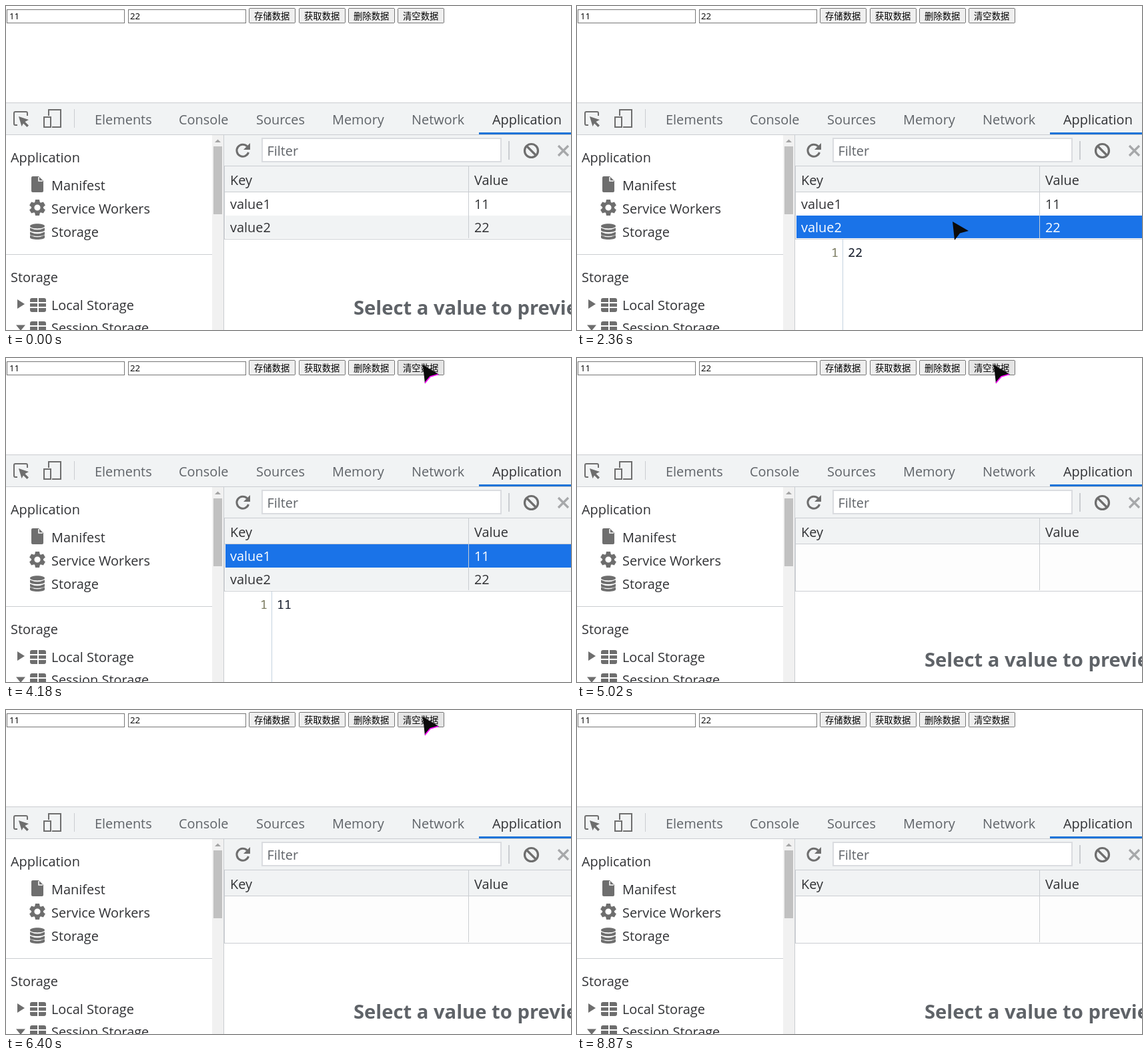
An HTML page that plays this animation: 847x487 px, repeating every 8.94 s.

```html
<!DOCTYPE html>
<html lang="zh">
<head>
<meta charset="utf-8">
<title>Storage panel</title>
<style>
html, body { margin: 0; width: 100%; height: 100%; overflow: hidden; background: #fff; }
svg { display: block; width: 847px; height: 487px; font: 19.9px "Open Sans", "Noto Sans", sans-serif; fill: #303134; }
rect, .line { shape-rendering: crispEdges; }
.line { fill: none; stroke: #cacdd1; }
.bar { fill: #f1f3f4; }
.icon { fill: #6e6e6e; }
.stroke { fill: none; stroke: #6e6e6e; stroke-width: 2; }
.dim { fill: #5f6368; }
.form { font: 13.333px "Open Sans", "Noto Sans CJK SC", "Noto Sans CJK", sans-serif; fill: #000; }
.form rect { fill: #fff; stroke: #767676; }
.form .button { fill: #efefef; }
.form .button.hover { fill: #e5e5e5; }
.code { font: 18.4px "Noto Sans Mono", "DejaVu Sans Mono", monospace; fill: #111827; }
.big { font-size: 29.2px; font-weight: 700; fill: #5f6368; }
.picked rect { fill: #1a73e8; }
.picked text { fill: #fff; }
</style>
</head>
<body>
<svg viewBox="0 0 847 487">
  <defs>
    <g id="grid" class="icon">
      <path d="M3 0H11V6H0V3Q0 0 3 0ZM13 0H21Q24 0 24 3V6H13ZM0 8H11V13H0ZM13 8H24V13H13ZM0 15H11V21H3Q0 21 0 18ZM13 15H24V18Q24 21 21 21H13Z"/>
    </g>
  </defs>

  <g class="form" id="form">
    <rect x="1.5" y="5.5" width="176" height="20"/><text x="5" y="20">11</text>
    <rect x="183.5" y="5.5" width="176" height="20"/><text x="186" y="20">22</text>
  </g>

  <rect class="bar" y="146" width="847" height="47"/>
  <path class="line" d="M0 145.5H847M0 193.5H847M102.5 155V183"/>
  <g class="stroke">
    <path d="M17 179H14Q12 179 12 177V161Q12 159 14 159H30Q32 159 32 161V165"/>
    <path d="M64 165V156H82V182H69"/>
    <rect x="57" y="167" width="10" height="15"/>
  </g>
  <path class="icon" d="M19 166L34 171L28.5 174L34 179.5L31.5 182L26 176.5L23.5 181Z"/>
  <g class="dim">
    <text x="133" y="178">Elements</text>
    <text x="259" y="178">Console</text>
    <text x="375" y="178">Sources</text>
    <text x="489" y="178">Memory</text>
    <text x="608" y="178">Network</text>
  </g>
  <text x="729" y="178">Application</text>
  <rect x="709" y="190" width="138" height="3" fill="#1a73d8"/>

  <g>
    <text x="7" y="235">Application</text>
    <text x="68" y="277">Manifest</text>
    <text x="68" y="312">Service Workers</text>
    <text x="68" y="347">Storage</text>
    <text x="7" y="415">Storage</text>
    <text x="68" y="457">Local Storage</text>
    <text x="68" y="491">Session Storage</text>
  </g>
  <path class="line" d="M0 373.5H309"/>
  <g class="icon">
    <path d="M40 256H49L56 263V278Q56 280 54 280H40Q38 280 38 278V258Q38 256 40 256Z"/>
    <path d="M49 257V263H55" fill="none" stroke="#fff" stroke-width="1.5"/>
    <g id="gear" transform="translate(47 303)"></g>
    <path d="M36 331C36 326 58 326 58 331C58 335.5 36 335.5 36 331Z"/>
    <path id="disc" d="M36 333.5Q47 339 58 333.5V337C58 341 36 341 36 337Z"/>
    <use href="#disc" y="6"/><use href="#disc" y="11"/>
    <path d="M17 441L28 448L17 455ZM15 479.5H29L22 488Z"/>
  </g>
  <use href="#grid" x="36" y="439"/>
  <use href="#grid" x="36" y="474"/>

  <rect x="309" y="194" width="17" height="293" fill="#f1f1f1"/>
  <rect x="311" y="211" width="13" height="102" fill="#c1c1c1"/>
  <path d="M313 205L317.5 200.5L322 205Z" fill="#a3a3a3"/>

  <rect class="bar" x="327" y="194" width="520" height="85"/>
  <rect x="384" y="199" width="358" height="35" fill="#fff" stroke="#dadce0" stroke-width="2"/>
  <text class="dim" x="391.5" y="225">Filter</text>
  <path class="line" d="M754 203V231" style="stroke-width:2"/>
  <path class="stroke" d="M361.5 211A9 9 0 1 0 363.5 220" style="stroke-width:3"/>
  <path class="icon" d="M366 206V216H356Z"/>
  <g class="stroke" style="stroke-width:3.2"><circle cx="787.5" cy="217.5" r="10"/><path d="M780.5 210.5L794.5 224.5"/></g>
  <path d="M828 210L843 225M843 210L828 225" stroke="#a6a8aa" stroke-width="3.2"/>
  <text x="336" y="269">Key</text><text x="702" y="269">Value</text>

  <rect id="blank" x="328" y="280" width="519" height="69" fill="#fdfdfd"/>
  <g id="rows">
    <g><rect x="329" y="280" width="518" height="35" fill="#fff"/><text x="336" y="305">value1</text><text x="702" y="305">11</text></g>
    <g><rect x="329" y="315" width="518" height="34" fill="#f1f3f4"/><text x="336" y="340">value2</text><text x="702" y="340">22</text></g>
  </g>
  <path class="line" d="M326.5 194V487M327 240.5H847M327 279.5H847M327.5 241V350M693.5 241V349M327 350.5H847"/>

  <text class="big" id="hint" x="521" y="464">Select a value to preview</text>
  <g class="code" id="preview">
    <path class="line" d="M398.5 351V487" style="stroke:#c5d3e0"/>
    <text x="381" y="377" fill="#77775c">1</text>
    <text id="shown" x="406" y="377"></text>
  </g>

  <g id="cursor">
    <path d="M0 0L24 14L11 17.5L3 28Z" fill="#0b0b0b"/>
    <path id="edge" d="M3 27L11 17.5L23 14" fill="none" stroke="#f0f" stroke-width="1.8"/>
  </g>
</svg>
<script>
const $ = id => document.getElementById(id);
const LOOP = 8940, START = 1250, STEP = 70;
const PICK_SECOND = 1900, PICK_FIRST = 2700, CLEAR = 4950, LEAVE = 7000;

// Pointer tip: time, x, y
const path = [
  [1250, 718, 487], [1600, 645, 206], [1850, 572, 321], [2080, 563, 324],
  [2360, 563, 324], [2600, 568, 299], [2990, 588, 297], [3340, 647, 19],
  [3500, 656, 22], [3850, 625, 10.5], [6680, 625, 10.5], [7520, 621, 72],
  [7940, 727, 488]
];

['存储数据', '获取数据', '删除数据', '清空数据'].forEach((label, i) => {
  const x = Math.round(364.2 + i * 74.3);
  $('form').insertAdjacentHTML('beforeend',
    `<rect class="button" x="${x + .5}" y="3.5" width="69" height="22" rx="2"/><text x="${x + 8}" y="20">${label}</text>`);
});
const clearButton = [...document.querySelectorAll('.button')].pop();

$('gear').innerHTML = '<circle r="6.8" fill="none" stroke="#6e6e6e" stroke-width="4.4"/>' +
  [0, 60, 120].map(a => `<path transform="rotate(${a})" d="M-3 -12H3L4 -7H-4ZM-3 12H3L4 7H-4Z"/>`).join('');

const show = (el, on) => el.style.display = on ? '' : 'none';

function pointAt(t) {
  const i = path.findIndex(p => p[0] > t);
  if (i < 1) return null;
  const [t0, x0, y0] = path[i - 1], [t1, x1, y1] = path[i];
  const u = (t - t0) / (t1 - t0), k = u * u * (3 - 2 * u);
  return [x0 + (x1 - x0) * k, y0 + (y1 - y0) * k];
}

function draw(time) {
  let t = time % LOOP;
  t = t < START ? 0 : Math.max(START, Math.floor((t - 50) / STEP) * STEP + 50);

  const picked = t < PICK_SECOND || t >= CLEAR ? -1 : t < PICK_FIRST ? 1 : 0;
  [...$('rows').children].forEach((row, i) => row.classList.toggle('picked', i === picked));
  show($('rows'), t < CLEAR);
  show($('hint'), picked < 0);
  show($('preview'), picked >= 0);
  $('shown').textContent = picked ? '22' : '11';

  const p = pointAt(t);
  show($('cursor'), p);
  const hover = p && p[1] < 26 && t < LEAVE;
  if (p) $('cursor').setAttribute('transform', `translate(${p})`);
  show($('edge'), hover);
  clearButton.classList.toggle('hover', !!hover);
}

const begin = performance.now();
(function tick() {
  draw(performance.now() - begin);
  requestAnimationFrame(tick);
})();
</script>
</body>
</html>
```
